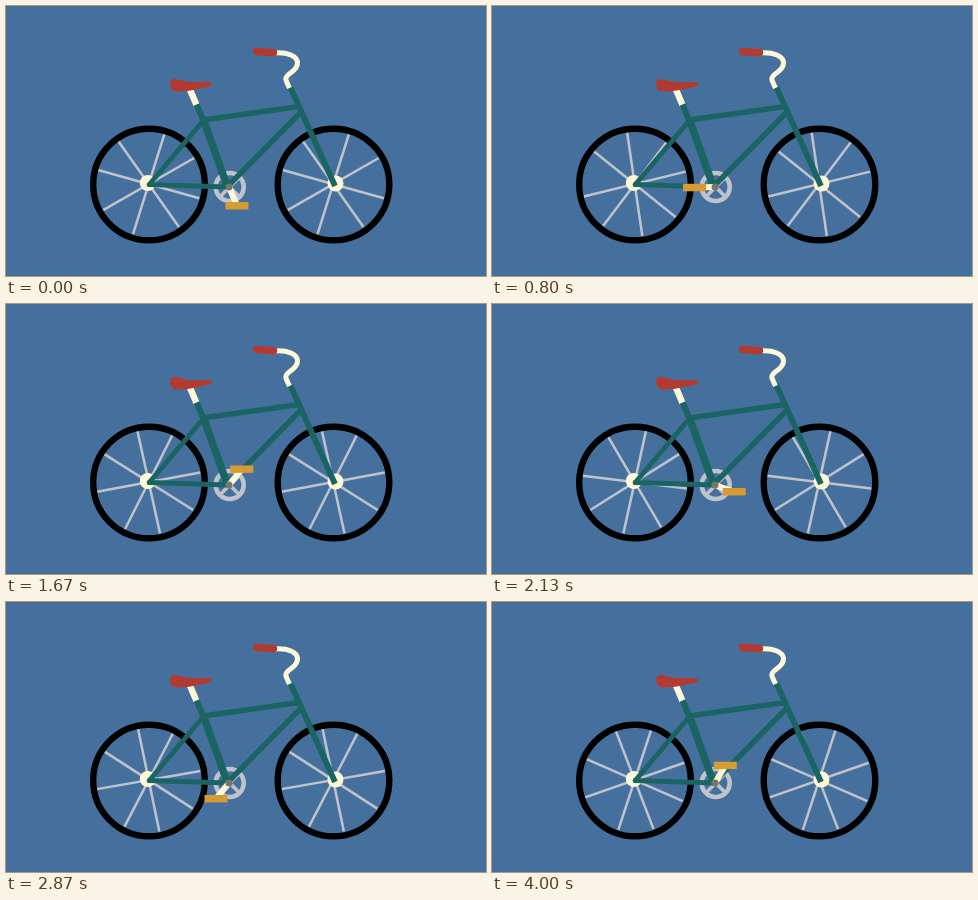
These frames come from a looping animation (480 by 270 pixels, 4070 ms). An HTML page with a canvas:

```html
<!DOCTYPE html>
<html lang="en">
<head>
<meta charset="utf-8">
<title>Bicycle</title>
<style>
  html, body { margin: 0; width: 100%; height: 100%; overflow: hidden; background: #45709e; }
  canvas { display: block; }
</style>
</head>
<body>
<canvas id="stage" width="480" height="270"></canvas>
<script>
const ctx = document.getElementById('stage').getContext('2d');
const SKY = '#45709e', GREEN = '#1a6563', CREAM = '#fdf9d8', RED = '#b33a30',
      GRAY = '#bfc3cb', OCHRE = '#d79b33', AXLE = '#77756b';
const LOOP = 4070, FPS = 15, LAST = 60, STEP = 10.04, LAG = 0.9;
const RAD = Math.PI / 180;
const SPOKES = [54.8, 107.4, 150.2, 195.6];
const CRANK = { x: 223, y: 181, length: 20.4, start: 67 };

function line(x1, y1, x2, y2, width, color, cap = 'butt') {
  ctx.beginPath();
  ctx.moveTo(x1, y1);
  ctx.lineTo(x2, y2);
  ctx.lineWidth = width;
  ctx.strokeStyle = color;
  ctx.lineCap = cap;
  ctx.stroke();
}

function ring(x, y, r, width, color) {
  ctx.beginPath();
  ctx.arc(x, y, r, 0, 7);
  ctx.lineWidth = width;
  ctx.strokeStyle = color;
  ctx.stroke();
}

function disc(x, y, r, color) {
  ctx.beginPath();
  ctx.arc(x, y, r, 0, 7);
  ctx.fillStyle = color;
  ctx.fill();
}

// A full diameter at the given angle in degrees
function diameter(x, y, r, deg, width) {
  const dx = r * Math.cos(deg * RAD), dy = r * Math.sin(deg * RAD);
  line(x - dx, y - dy, x + dx, y + dy, width, GRAY);
}

function wheel(x, y, turn) {
  for (const deg of SPOKES) diameter(x - 0.3, y - 0.4, 52.5, deg + turn, 2.5);
  ring(x, y, 55.8, 6.4, '#000');
}

function chainring(x, y) {
  ring(x, y, 14, 4.6, GRAY);
  for (const deg of [45, 135]) diameter(x, y, 13, deg, 3.6);
}

function frame() {
  line(143.3, 178.5, 222, 181, 5, GREEN, 'round');
  line(143.3, 178.5, 197, 115, 5, GREEN, 'round');
  line(197, 114, 293, 100.5, 5.4, GREEN);
  line(295, 106, 222, 180, 5.4, GREEN);
  line(183.7, 83, 190.5, 99, 6.4, CREAM);
  line(190.6, 98.5, 198, 116, 6, GREEN);
  line(197.5, 114, 221.5, 181, 7.5, GREEN);
  line(284.5, 81.5, 329, 180, 5.8, GREEN);
}

function saddle() {
  ctx.beginPath();
  ctx.moveTo(164, 77);
  ctx.bezierCurveTo(164, 73, 168, 72.5, 172, 73.5);
  ctx.bezierCurveTo(181, 77, 193, 76, 203, 76);
  ctx.bezierCurveTo(207, 76, 207, 80, 203, 80.7);
  ctx.bezierCurveTo(194, 82, 188, 85.3, 170, 85.5);
  ctx.bezierCurveTo(166, 85, 164, 81, 164, 77);
  ctx.fillStyle = RED;
  ctx.fill();
}

function handlebar() {
  ctx.beginPath();
  ctx.moveTo(268, 47);
  ctx.bezierCurveTo(282, 46, 291.5, 50, 291.5, 57);
  ctx.bezierCurveTo(291.5, 66, 280, 67, 279.8, 73);
  ctx.quadraticCurveTo(280, 75, 283.5, 82);
  ctx.lineWidth = 5;
  ctx.strokeStyle = CREAM;
  ctx.lineCap = 'butt';
  ctx.stroke();
  line(250.5, 45.5, 267.5, 46.7, 7.4, RED, 'round');
}

function pedal(turn) {
  const { x, y, length, start } = CRANK;
  const a = (start + turn) * RAD;
  const px = x + length * Math.cos(a), py = y + length * Math.sin(a);
  line(x, y, px, py, 6, CREAM);
  disc(x, y, 3.5, AXLE);
  ctx.fillStyle = OCHRE;
  ctx.fillRect(px - 11.5, py - 3.7, 23, 7.4);
}

function draw(ms) {
  const n = Math.min(LAST, Math.floor((ms + 5) * FPS / 1000));
  const turn = Math.max(0, n - LAG) * STEP;
  ctx.fillStyle = SKY;
  ctx.fillRect(0, 0, 480, 270);
  wheel(143, 178.5, turn);
  wheel(327.5, 178.5, turn);
  disc(141.8, 177, 8, CREAM);
  disc(329.5, 177.5, 8, CREAM);
  chainring(223.7, 181);
  frame();
  saddle();
  handlebar();
  pedal(turn);
}

const begin = performance.now();
function tick() {
  draw((performance.now() - begin) % LOOP);
  requestAnimationFrame(tick);
}
tick();
</script>
</body>
</html>
```
